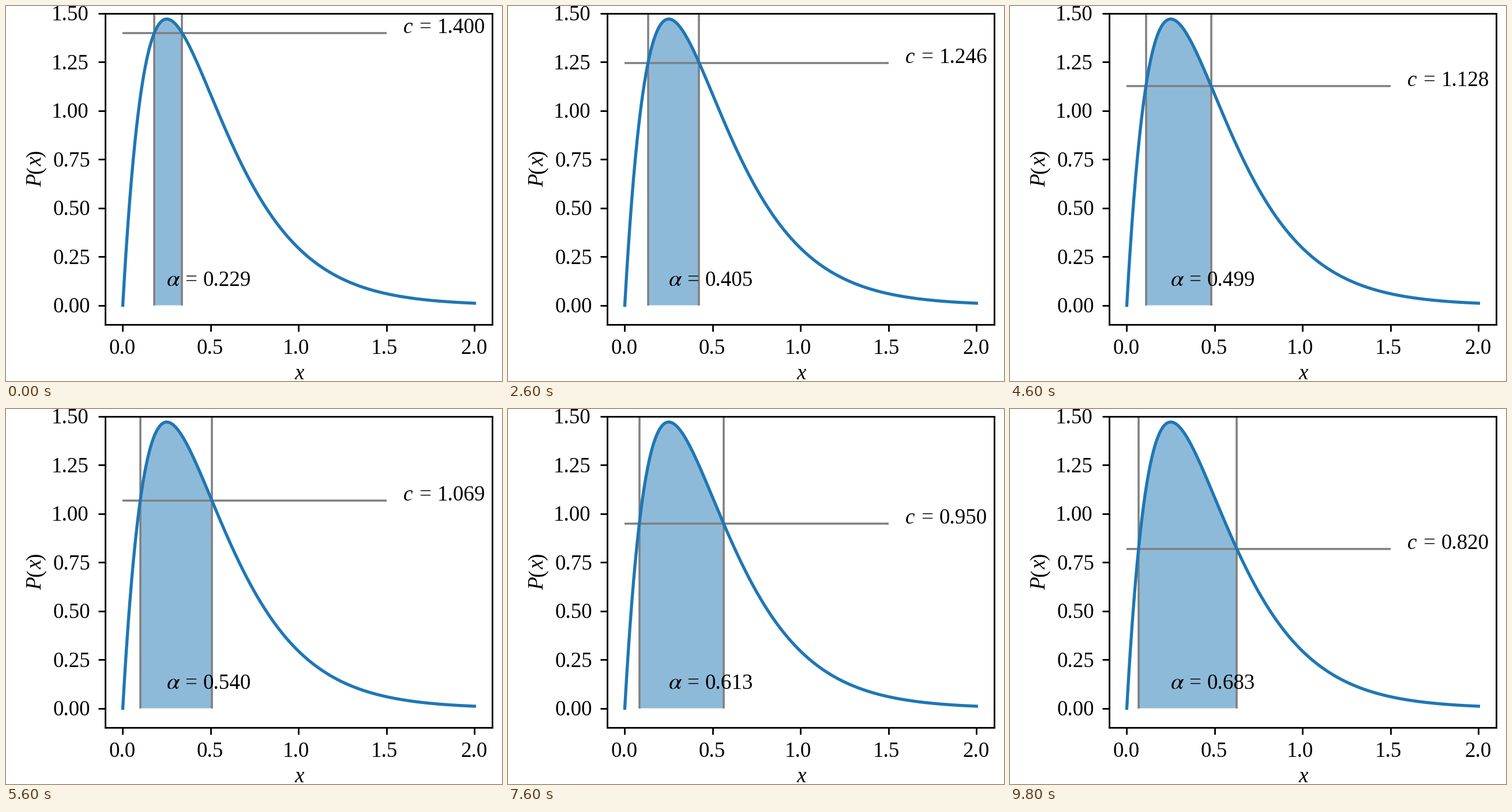
Animation of 860x651 px, one loop 10 s. Source, as a matplotlib script:

```python
import numpy as np
import matplotlib.pyplot as plt
from matplotlib.animation import FuncAnimation

W, H, DPI = 860, 651, 256
EM = 37.0                      # font size in pixels
FRAMES, INTERVAL = 50, 200

plt.rcParams["mathtext.fontset"] = "stix"
plt.rcParams["font.family"] = "Liberation Serif"

fig = plt.figure(figsize=(W / DPI, H / DPI), dpi=DPI, facecolor="white")
ax = fig.add_axes([0.2, 0.15, 0.78, 0.83])
ax.set_xlim(-0.1, 2.1)
ax.set_ylim(-0.1, 1.5)
ax.set_xticks(np.arange(0, 2.1, 0.5))
ax.set_yticks(np.arange(0, 1.6, 0.25))
ax.tick_params(length=3.5, width=0.8, labelbottom=False, labelleft=False)
for spine in ax.spines.values():
    spine.set_linewidth(0.8)


def density(x):
    return 16 * x * np.exp(-4 * x)


def tail(x):
    return (1 + 4 * x) * np.exp(-4 * x)


def px(x):
    return W * (0.2 + 0.78 * (x + 0.1) / 2.2)


def py(y):
    return H * (1 - 0.15 - 0.83 * (y + 0.1) / 1.6)


def put(x, y, s, size=EM, **kw):
    """Text with its baseline start at pixel (x, y), y counted downwards."""
    return fig.text(x / W, 1 - y / H, s, fontsize=size * 72 / DPI,
                    ha="left", va="baseline", color="black", **kw)


# Tick labels start with the ink of their first digit.
BEARING = {"0": 0.024, "1": 0.111, "2": 0.03}


def tick_label(left, base, s):
    put(left - BEARING[s[0]] * EM, base, s)


for v in ax.get_xticks():
    tick_label(px(v) - 0.625 * EM, 603.5, f"{v:.1f}")
for v in ax.get_yticks():
    tick_label(82.4, py(v) + 12.4, f"{v:.2f}")

put(500.3, 648, "x", style="italic")
pos = 314.5
for ch, style, adv in (("P", "italic", 0.64), ("(", "normal", 0.333),
                       ("x", "italic", 0.444), (")", "normal", 0.333)):
    put(61, pos, ch, style=style, rotation=90, rotation_mode="anchor")
    pos -= adv * EM

# Curve, shaded region and guide lines
xs = np.linspace(0, 2, 1000)
ax.plot(xs, density(xs), color="C0", lw=1.5, zorder=2.5)
area, = ax.fill([0, 0, 0], [0, 0, 0], color="C0", alpha=0.5, lw=0, zorder=1)
guide = dict(color="gray", lw=1.0, solid_capstyle="butt", zorder=2)
level, = ax.plot([0, 1.5], [1.4, 1.4], **guide)
sides = [ax.plot([0, 0], [0, 1.6], **guide)[0] for _ in range(2)]

# Labels that count
ax0, ay0 = px(0.25), py(0.1)
put(ax0 - 1, ay0, r"$\alpha$", size=1.1 * EM)
put(ax0 + 31.4, ay0, "=")
alpha_text = put(ax0 + 62.8, ay0, "")
cx = px(1.6)
c_parts = [put(cx - 1, 0, "c", style="italic"),
           put(cx + 26, 0, "="),
           put(cx + 57.2, 0, "")]

rise = np.linspace(0, 0.25, 4000)
fall = np.linspace(2, 0.25, 8000)
levels = np.linspace(1.4, 0.82, FRAMES)


def draw(i):
    c = levels[i]
    a = np.interp(c, density(rise), rise)
    b = np.interp(c, density(fall), fall)
    x = np.linspace(a, b, 200)
    area.set_xy(np.column_stack([np.r_[a, x, b], np.r_[0, density(x), 0]]))
    level.set_ydata([c, c])
    for line, v in zip(sides, (a, b)):
        line.set_xdata([v, v])
    alpha_text.set_text(f"{tail(a) - tail(b):.3f}")
    for part in c_parts:
        part.set_y(1 - py(c) / H)
    c_parts[-1].set_text(f"{c:.3f}")
    return [area, level, *sides, alpha_text, *c_parts]


anim = FuncAnimation(fig, draw, frames=FRAMES, interval=INTERVAL,
                     repeat=True, repeat_delay=0, blit=False)
plt.show()
```
